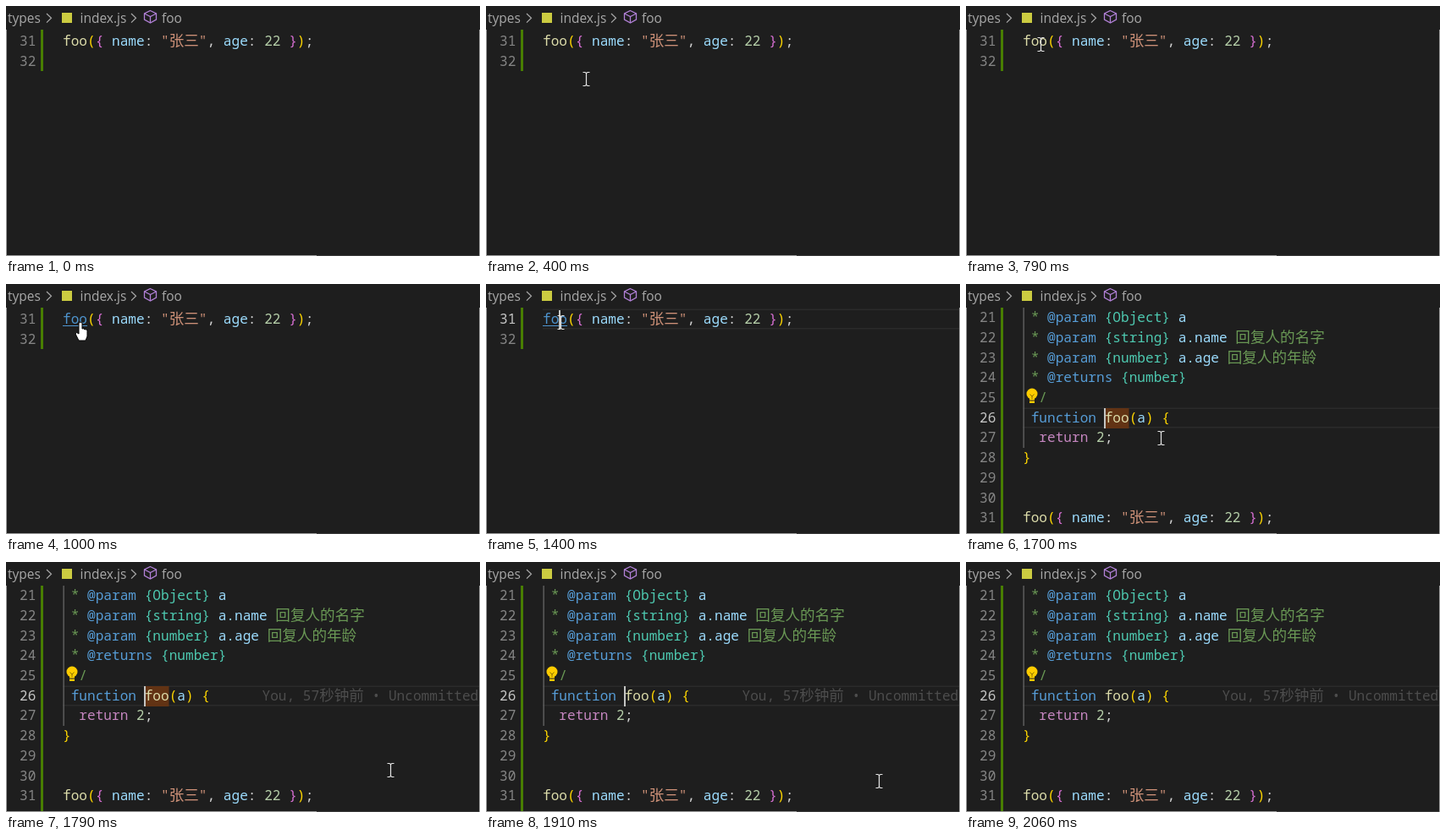
Animation of 560x296 px, one loop 2.4 s. Source, as an HTML page with a canvas:

```html
<!DOCTYPE html>
<html lang="en">
<head>
<meta charset="utf-8">
<title>Go to definition</title>
<style>
html, body { margin: 0; width: 100%; height: 100%; overflow: hidden; background: #1e1e1e; }
canvas { display: block; }
</style>
</head>
<body>
<canvas id="stage" width="560" height="296"></canvas>
<script>
const ctx = document.getElementById('stage').getContext('2d');
const LOOP = 2400, CELL = 9.676, LINE = 23.7, LEFT = 67;
const MONO = '16.127px "Noto Sans Mono", "DejaVu Sans Mono", monospace';
const HAN = '17.6px "Noto Sans CJK SC", "Noto Sans CJK", sans-serif';
const UI = '15.5px "Open Sans", "Noto Sans", sans-serif';

const C = {
  bg: '#1e1e1e', plain: '#d4d4d4', num: '#858585', active: '#c6c6c6',
  green: '#6a9955', blue: '#569cd6', teal: '#4ec9b0', name: '#9cdcfe',
  fn: '#dcdcaa', gold: '#ffd700', pink: '#da70d6', str: '#ce9178',
  digit: '#b5cea8', key: '#c586c0', link: '#4e94ce', blame: '#4d4d4d',
  caret: '#c4c5c3', header: '#a9a9a9', current: '#2b2b2b'
};

// Mouse path: time, x, y
const ENTER = [[280, 433, 292], [310, 405, 274], [340, 303, 205], [370, 193, 137],
  [400, 118, 86], [460, 102, 69], [550, 93, 55], [670, 89, 48], [790, 88, 45]];
const LEAVE = [[1580, 88, 45], [1610, 94, 54], [1640, 115, 85], [1670, 155, 136],
  [1700, 230, 182], [1730, 312, 222], [1760, 410, 241], [1790, 454, 246],
  [1880, 459, 254], [1940, 468, 264], [2000, 488, 279], [2030, 502, 291]];

function follow(path, t) {
  const t0 = path[0][0];
  t = t0 + Math.floor((t - t0) / 30) * 30;
  let i = 1;
  while (i < path.length - 1 && path[i][0] < t) i++;
  const a = path[i - 1], b = path[i];
  const k = Math.min(1, Math.max(0, (t - a[0]) / (b[0] - a[0])));
  return [a[1] + (b[1] - a[1]) * k, a[2] + (b[2] - a[2]) * k];
}

function box(color, x, y, w, h) {
  ctx.fillStyle = color;
  ctx.fillRect(x, y, w, h);
}

function line(color, width, points, close) {
  ctx.strokeStyle = color;
  ctx.lineWidth = width;
  ctx.beginPath();
  points.forEach(([x, y]) => ctx.lineTo(x, y));
  if (close) ctx.closePath();
  ctx.stroke();
}

// Tokens alternate colour and text; Han runs use their own font.
function code(x, y, ...tokens) {
  for (let i = 0; i < tokens.length; i += 2) {
    ctx.fillStyle = tokens[i];
    for (const run of tokens[i + 1].split(/([\u3400-\u9fff]+)/)) {
      if (!run) continue;
      ctx.font = /[\u3400-\u9fff]/.test(run) ? HAN : MONO;
      ctx.fillText(run, x, y);
      x += ctx.measureText(run).width;
    }
  }
}

function label(text, x) {
  ctx.font = UI;
  ctx.fillStyle = C.header;
  ctx.fillText(text, x, 19.5);
}

function header() {
  label('types', 2);
  label('index.js', 87.5);
  label('foo', 184);
  for (const x of [48, 148]) line(C.header, 1.2, [[x, 9], [x + 5.5, 14.3], [x, 19.6]]);
  box('#cbcb41', 66, 8, 12, 12);
  const purple = '#b180d7';
  line(purple, 1.3, [[170.5, 5.5], [177.5, 9], [177.5, 16], [170.5, 20], [163.5, 16], [163.5, 9]], true);
  line(purple, 1.3, [[163.5, 9], [170.5, 12.5], [177.5, 9]]);
  line(purple, 1.3, [[170.5, 12.5], [170.5, 20]]);
}

function frameEdges() {
  box('#9b9b9b', 0, 28, 1, 268);
  box('#9b9b9b', 0, 295, 560, 1);
  box('#9b9b9b', 559, 28, 1, 268);
  box('#3a3a3a', 367, 295, 192, 1);
}

function currentLine(y) {
  box(C.current, LEFT, y, 492, 1.5);
  box(C.current, LEFT, y + 22.5, 492, 1.5);
}

function lineNumber(n, y, on) {
  code(16, y, on ? C.active : C.num, String(n));
}

function callLine(y, linked) {
  code(LEFT, y, linked ? C.link : C.fn, 'foo', C.gold, '(', C.pink, '{ ',
    C.name, 'name', C.plain, ': ', C.str, '"张三"', C.plain, ', ',
    C.name, 'age', C.plain, ': ', C.digit, '22', C.pink, ' }', C.gold, ')', C.plain, ';');
  if (linked) box(C.link, LEFT, y + 2, 3 * CELL, 1);
}

function callView(t) {
  const clicked = t >= 1360;
  if (clicked) currentLine(29.5);
  box('#487e02', 41, 28, 3, 49);
  lineNumber(31, 47, clicked);
  lineNumber(32, 70.5, false);
  callLine(47, t >= 880);
  if (clicked) box(C.caret, 86, 31, 2, 23);
}

function bulb(x, y) {
  ctx.fillStyle = '#ffcc00';
  ctx.beginPath();
  ctx.arc(x, y, 6.5, 0, Math.PI * 2);
  ctx.fill();
  ctx.fillRect(x - 3, y + 5, 6, 6);
  box(C.bg, x - 3, y + 7.5, 6, 1);
  line('#8a6d00', 1, [[x - 2.5, y + 0.5], [x, y + 3], [x + 2.5, y + 0.5]]);
  line('#8a6d00', 1, [[x, y + 3], [x, y + 6]]);
}

function doc(y, type, param, note) {
  code(LEFT + CELL, y, C.green, '* ', C.blue, param ? '@param ' : '@returns ',
    C.teal, type, C.name, param ? ' ' + param : '', C.green, note ? ' ' + note : '');
}

function definitionView(t) {
  const at = n => Math.round(45.2 + (n - 21) * LINE);
  currentLine(146.5);
  box('#487e02', 41, 28, 3, 267);
  box('#686868', 67.5, 28, 1.25, 166);
  for (let n = 21; n <= 31; n++) lineNumber(n, at(n), n === 26);
  doc(at(21), '{Object}', 'a');
  doc(at(22), '{string}', 'a.name', '回复人的名字');
  doc(at(23), '{number}', 'a.age', '回复人的年龄');
  doc(at(24), '{number}');
  code(LEFT + 2 * CELL, at(25), C.green, '/');
  bulb(78, 130);
  if (t < 1880) box('#623314', 164, 147, 28.5, 24);
  code(LEFT + CELL, at(26), C.blue, 'function ', C.fn, 'foo', C.gold, '(',
    C.name, 'a', C.gold, ') {');
  if (t >= 1760) code(302.5, at(26), C.blame, 'You, 57秒钟前 • Uncommitted');
  code(LEFT + 2 * CELL, at(27), C.key, 'return ', C.digit, '2', C.plain, ';');
  code(LEFT, at(28), C.gold, '}');
  callLine(at(31), false);
  if (t < 2030) box(C.caret, 163, 147, 2, 24);
}

function beam(x, y) {
  x = Math.round(x) + 0.5;
  y = Math.round(y) + 0.5;
  const ink = '#e6e6e6';
  line(ink, 1.2, [[x, y - 7], [x, y + 7]]);
  for (const s of [-1, 1]) {
    line(ink, 1.1, [[x - 4, y + 8 * s], [x - 1.5, y + 8 * s], [x, y + 7 * s],
      [x + 1.5, y + 8 * s], [x + 4, y + 8 * s]]);
  }
}

function hand(x, y) {
  ctx.save();
  ctx.translate(x, y);
  ctx.lineJoin = 'round';
  const outline = new Path2D('M-2 1Q0-1 2 1V8Q4 7 5 9Q7 8 8 10V17L6 22H-2L-6 14Q-5 11-2 14Z');
  ctx.fillStyle = '#fff';
  ctx.fill(outline);
  ctx.strokeStyle = '#000';
  ctx.lineWidth = 1;
  ctx.stroke(outline);
  ctx.restore();
}

function mouse(t) {
  if (t < 280 || t >= 2060) return;
  if (t >= 910 && t < 1390) hand(88, 45);
  else beam(...follow(t < 1580 ? ENTER : LEAVE, t));
}

function draw(t) {
  box(C.bg, 0, 0, 560, 296);
  header();
  if (t < 1520) callView(t);
  else definitionView(t);
  frameEdges();
  mouse(t);
}

let start;
function tick(now) {
  start ??= now;
  draw((now - start) % LOOP);
  requestAnimationFrame(tick);
}
draw(0);
requestAnimationFrame(tick);
</script>
</body>
</html>
```
